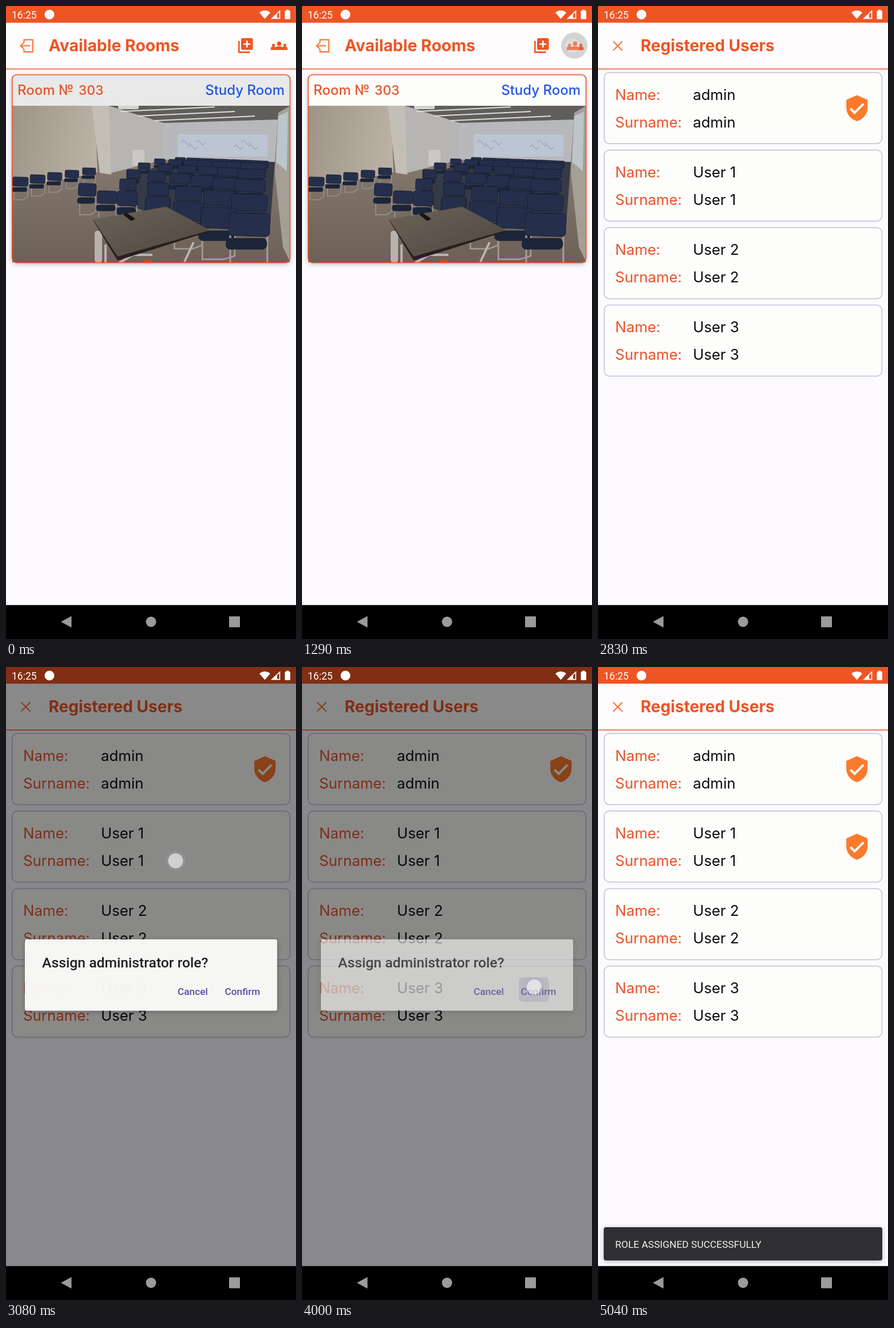
An HTML page that plays this animation: 507x1104 px, repeating every 5.08 s.

```html
<!DOCTYPE html>
<html lang="en">
<head>
<meta charset="utf-8">
<title>Room booking</title>
<style>
html, body { margin: 0; height: 100%; overflow: hidden; background: #fdfafe; }
svg { display: block; width: 100vw; height: 100vh; }
text { white-space: pre; }
.m { font-family: Montserrat, Inter, sans-serif; }
.r { font-family: Roboto, sans-serif; }
.shadow { filter: drop-shadow(0 2px 4px #0004); }
</style>
</head>
<body>
<svg id="stage" viewBox="0 0 507 1104" preserveAspectRatio="none">
  <defs>
    <linearGradient id="wall" x2="1" y2=".2"><stop stop-color="#9d9386"/><stop offset="1" stop-color="#bab1a4"/></linearGradient>
    <linearGradient id="floor" x2="0" y2="1"><stop stop-color="#92857a"/><stop offset="1" stop-color="#6c6057"/></linearGradient>
    <linearGradient id="desk" x2="1" y2="1"><stop stop-color="#6c6258"/><stop offset="1" stop-color="#4e463f"/></linearGradient>
    <clipPath id="photoClip"><rect x="11" y="174" width="485" height="273"/></clipPath>
    <g id="shield">
      <path d="M452.7 155.5l18.6 8.3v12.4q0 18-18.6 24.8q-18.6-6.8-18.6-24.8v-12.4z" fill="#fb7a2c"/>
      <path d="M441.5 179l7.2 7.2 15.5-15.6" fill="none" stroke="#fdfdfb" stroke-width="4"/>
    </g>
    <g id="touch"><circle r="17" fill="#a9a7c4" opacity=".35"/><circle r="13" fill="#fff" opacity=".85"/></g>
  </defs>
</svg>
<script>
const ORANGE = '#ee5524', GRAY = '#9b9b9b', LOOP = 5080;
const stage = document.getElementById('stage');

const rect = (x, y, w, h, fill, r = 0, extra = '') =>
  `<rect x="${x}" y="${y}" width="${w}" height="${h}" rx="${r}" fill="${fill}" ${extra}/>`;
const poly = (points, fill) => `<polygon points="${points}" fill="${fill}"/>`;
const circle = (x, y, r, fill, extra = '') => `<circle cx="${x}" cy="${y}" r="${r}" fill="${fill}" ${extra}/>`;
const line = (d, color, width) =>
  `<path d="${d}" fill="none" stroke="${color}" stroke-width="${width}"/>`;
const text = (x, y, size, str, fill, font = 'm', weight = 400, extra = '') =>
  `<text x="${x}" y="${y}" class="${font}" font-size="${size}" font-weight="${weight}" fill="${fill}" ${extra}>${str}</text>`;
const group = (id, body) => `<g id="${id}">${body}</g>`;
const repeat = (n, f) => Array.from({ length: n }, (_, i) => f(i)).join('');

const ramp = (t, a, b) => Math.min(1, Math.max(0, (t - a) / (b - a)));
const mix = (a, b, k) => a + (b - a) * k;
const easeOut = k => 1 - (1 - k) ** 2;

function chair(x, y, w, h, legs) {
  const foot = y + h * 2.5;
  return (legs ? line(`M${x + 2} ${y + h}V${foot}h${w * .6}l${w * .3} -6V${y + h}`, '#a19b96', w / 22) : '') +
    rect(x - w * .08, y + h * 1.12, w, h * .5, '#1c2539', h * .2) +
    rect(x, y, w, h, '#252f4b', h * .16, `stroke="#141b2c" stroke-width=".8" transform="rotate(2 ${x} ${y})"`);
}

// Seating in perspective: row 0 is the farthest, each row runs left to right
function seating() {
  const rows = 6;
  return repeat(rows, row => {
    const far = 1 - row / (rows - 1), k = easeOut(far), n = Math.round(mix(5, 7, far));
    return repeat(n, i => {
      const across = i / (n - 1);
      return chair(
        mix(mix(195, 296, far * far), mix(390, 415, far), across),
        mix(mix(322, 264, k), mix(360, 269, k), across),
        mix(mix(35, 18, k), mix(72, 44, k), across),
        mix(mix(26, 9, k), mix(40, 11, k), across),
        row === rows - 1);
    });
  });
}

const photo = () => '<g clip-path="url(#photoClip)">' +
  rect(11, 174, 486, 274, 'url(#floor)') +
  poly('11,174 155,174 160,290 11,322', 'url(#wall)') +
  poly('180,174 276,200 276,268 180,292', '#b6b5b3') +
  poly('274,200 476,190 470,272 274,268', '#b6b8bb') +
  poly('180,174 497,174 476,198 276,204', '#605e5d') +
  repeat(3, i => line(`M${200 + i * 30} ${184 + i * 8}l${165 + i * 5} -8`, '#dededa', 2)) +
  poly('150,174 180,174 184,294 164,291', '#c3beb6') +
  rect(196, 172, 36, 8, '#d4d2ce', 3) +
  rect(221, 251, 21, 27, '#c9c8c5') +
  rect(300, 224, 157, 39, '#bdc4d2') +
  repeat(6, i => line(`M${306 + i % 3 * 13 + (i > 2) * 92} ${238 + i % 2 * 8}q4-7 8 0t8 0`, '#8790a8', 1)) +
  poly('476,186 497,174 497,447 484,420 470,290', '#a59f96') +
  poly('476,192 493,184 491,288 472,272', '#bcc5ca') +
  poly('210,300 296,268 470,272 462,380 320,390 210,345', '#353a47') +
  repeat(5, i => chair(12 + i * 30.5, 298 - i * 4, 27 - i, 16 - i, true)) +
  seating() +
  repeat(2, i => chair(127 + i * 33, 309 + i * 13, 31 + i * 3, 22, true)) +
  rect(155, 392, 13, 56, '#b8b2aa', 5) +
  line('M174 416V448M222 434l-24 14M222 434h34M312 446l16-34', '#bbb5ae', 4) +
  poly('152,373 280,350 357,393 195,444', '#25211f') +
  poly('152,372 280,350 357,391 195,437', 'url(#desk)') +
  poly('205,364 211,361 226,371 219,375', '#171515') +
  circle(247, 451, 10, '#c8472a') + '</g>';

const header = (title, size) =>
  rect(0, 29.6, 507, 1016, '#fdfafe') + rect(0, 29.6, 507, 80, '#fefcfd') +
  rect(0, 109, 507, 1.6, '#ec6238') + text(74.5, 79.3, size, title, ORANGE, 'm', 700);

// One head with shoulders; y is the head's centre
const person = (x, y, r, w) => circle(x, y, r, ORANGE) +
  `<path d="M${x - w} 76.8v-2q0-4.6 ${w}-4.6t${w} 4.6v2z" fill="${ORANGE}"/>`;

const rooms = header('Available Rooms', 28.4) +
  line('M31.5 64V58.8H46.8V80H31.5V75M42 69.4H25.5M31 64l-5.4 5.4 5.4 5.4', '#f4803f', 2.3) +
  rect(411, 56, 20.5, 20.5, ORANGE, 2.5) +
  line('M407.3 61V80.6H426.5', ORANGE, 2.6) +
  line('M421.2 60.5V72.5M415.2 66.5H427.2', '#fff', 2.5) +
  group('iconRipple', circle(476, 69, 23, '#000', 'opacity=".16"')) +
  person(477.5, 65.7, 3.7, 7.4) + person(467.6, 68.2, 2.5, 4.8) + person(487.4, 68.2, 2.5, 4.8) +
  rect(10.5, 120, 486, 328, '#fdfdfb', 8, 'id="roomCard" class="shadow"') +
  photo() +
  rect(10.7, 120, 485.8, 327.7, 'none', 8, `stroke="${ORANGE}" stroke-width="1.6"`) +
  text(20, 154.5, 24, 'Room №', '#e5552a', 'm', 500) +
  text(170.5, 154.5, 23, '303', '#e5552a', 'm', 500, 'text-anchor="end"') +
  text(487, 154.5, 24, 'Study Room', '#2456e0', 'm', 500, 'text-anchor="end"');

function userCard(name, i) {
  const y = 116 + i * 135.2;
  return rect(10.8, y, 485.6, 124, '#fdfdfb', 9, 'stroke="#c2bedb" stroke-width="1.5"') +
    ['Name:', 'Surname:'].map((label, row) =>
      text(30, y + 47.7 + row * 48, 25.8, label, '#e8532a') +
      text(166, y + 47.7 + row * 48, 25.8, name, '#0c0c0e')).join('');
}

const users = header('Registered Users', 28) +
  line('M26.5 61.5l16 16M42.5 61.5l-16 16', '#f0763a', 2.1) +
  ['admin', 'User 1', 'User 2', 'User 3'].map(userCard).join('') +
  '<use href="#shield"/><use id="newShield" href="#shield" y="135.2"/>';

const dialog = rect(33, 475, 441, 124.5, '#fbfbf9', 3, 'class="shadow"') +
  rect(379, 541, 53, 43, '#6750a4', 8, 'id="buttonRipple"') +
  text(63, 523.5, 24.7, 'Assign administrator role?', '#1c1b1f', 'r', 500) +
  text(300, 571.7, 17.26, 'Cancel', '#6049a0', 'r', 500) +
  text(382.5, 571.7, 17.26, 'Confirm', '#6049a0', 'r', 500);

const snackbar = rect(10, 977, 487, 58, '#303032', 4, 'class="shadow"') +
  text(30, 1012.5, 17.4, 'ROLE ASSIGNED SUCCESSFULLY', '#f1f0f1', 'r');

const statusBar = text(10, 21.7, 17.5, '16:25', '#fff', 'r') +
  circle(76, 15, 8.5, '#fff') +
  '<path d="M443 11.5Q452.5 4 462 11.5L452.5 22.5Z" fill="#fff"/>' +
  line('M465 21.6H478.5V9Z', '#fff', 1.7) + poly('465,22 474,13 474,22', '#fff') +
  rect(487.5, 8, 9.5, 15, '#fff', 1.5) + rect(490, 6.5, 4.5, 3, '#fff');

const navBar = rect(0, 1044.8, 507, 60, '#000') + poly('96,1074 114.5,1064 114.5,1084', GRAY) +
  circle(253.5, 1074, 9, GRAY) + rect(390, 1064.5, 19, 19, GRAY, 1);

const touch = (id, x, y) => `<use id="${id}" href="#touch" x="${x}" y="${y}"/>`;

stage.insertAdjacentHTML('beforeend',
  rect(0, 0, 507, 29.6, ORANGE) + group('rooms', rooms) + group('users', users) + group('snackbar', snackbar) +
  rect(0, 0, 507, 1045, '#000', 0, 'id="scrim"') + group('dialog', dialog) + statusBar + navBar +
  touch('tapUsers', 473, 69) + touch('tapCard', 296.5, 338) + touch('tapConfirm', 406, 558));

const el = id => document.getElementById(id);
const show = (id, opacity) => el(id).setAttribute('opacity', opacity);
const pulse = (t, a, b, rise = 50, fall = 70) => ramp(t, a, a + rise) * (1 - ramp(t, b - fall, b));

function draw(t) {
  el('roomCard').setAttribute('fill', t < 960 ? '#e8e9e8' : '#fdfdfb');
  show('iconRipple', pulse(t, 1170, 1480, 90, 150));
  show('tapUsers', .35 * pulse(t, 1150, 1340));
  show('users', easeOut(ramp(t, 1420, 1640)));

  show('tapCard', pulse(t, 2930, 3130));
  show('scrim', .46 * ramp(t, 2960, 3070) * (1 - ramp(t, 4040, 4220)));
  show('dialog', easeOut(ramp(t, 2960, 3110)) * (1 - ramp(t, 3950, 4075)));
  show('buttonRipple', .2 * pulse(t, 3880, 4100, 90, 90));
  show('tapConfirm', .85 * pulse(t, 3860, 4060));

  const k = easeOut(ramp(t, 4420, 4570));
  show('newShield', t < 4420 ? 0 : 1);
  show('snackbar', k);
  el('snackbar').setAttribute('transform', `translate(253.5 1006) scale(${mix(.8, 1, k)}) translate(-253.5 -1006)`);
}

const start = performance.now();
function tick() {
  draw((performance.now() - start) % LOOP);
  requestAnimationFrame(tick);
}
tick();
</script>
</body>
</html>
```
